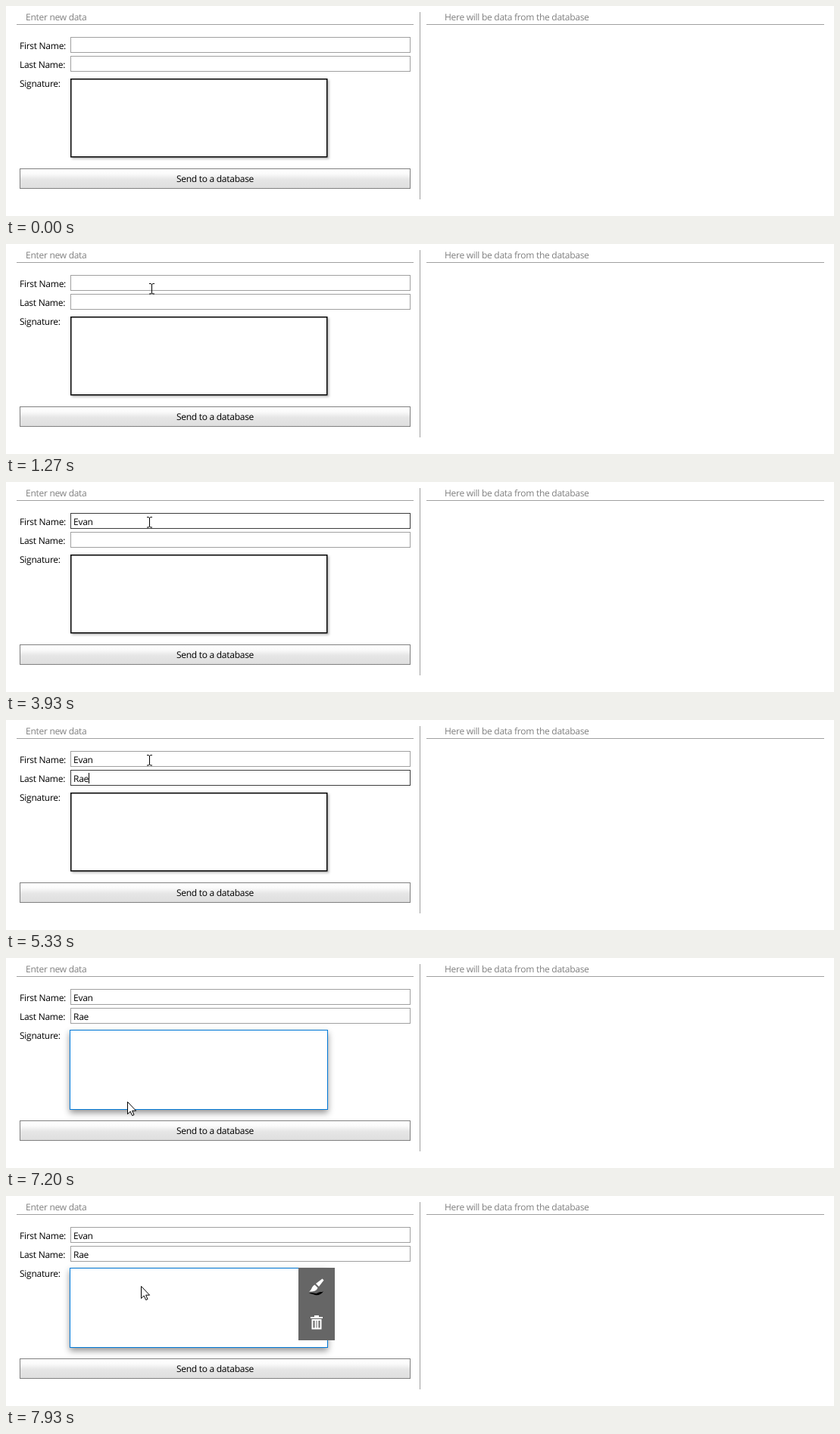
Recreate the animation shown at these times as an HTML page. Size 1093 by 278 pixels, loop 8000 ms.

```html
<!DOCTYPE html>
<html lang="en">
<head>
<meta charset="utf-8">
<title>Signature form</title>
<style>
  html, body { margin: 0; width: 100%; height: 100%; overflow: hidden; background: #fff; }
  svg { display: block; width: 100%; height: 100%; }
  text { font: 12px "Open Sans", "Noto Sans", sans-serif; letter-spacing: -0.27px; text-rendering: geometricPrecision; white-space: pre; }
  .head { fill: #808080; }
  .rule { stroke: #a0a0a0; }
  .field { fill: #fff; stroke: #a0a0a0; }
  .field.focus { stroke: #3c3c3c; }
</style>
</head>
<body>
<svg viewBox="0 0 1093 278">
  <defs>
    <linearGradient id="face" x1="0" y1="0" x2="0" y2="1">
      <stop offset="0" stop-color="#fff"/>
      <stop offset=".25" stop-color="#fbfbfb"/>
      <stop offset=".55" stop-color="#e6e6e6"/>
      <stop offset="1" stop-color="#dedede"/>
    </linearGradient>
    <filter id="soft" x="-10%" y="-20%" width="120%" height="140%"><feDropShadow dx="2" dy="2" stdDeviation="1.5" flood-opacity=".25"/></filter>
    <filter id="lift" x="-10%" y="-20%" width="120%" height="140%"><feDropShadow dx="0" dy="4" stdDeviation="4" flood-opacity=".42"/></filter>
  </defs>

  <text class="head" x="26" y="19">Enter new data</text>
  <text class="head" x="579" y="19">Here will be data from the database</text>
  <path class="rule" fill="none" d="M14 24.5H538M555 24.5H1080M546.5 8V256"/>

  <text x="18" y="57">First Name:</text>
  <text x="18" y="82">Last Name:</text>
  <text x="18" y="107">Signature:</text>

  <rect id="field0" class="field" x="85.5" y="41.5" width="448" height="20"/>
  <rect id="field1" class="field" x="85.5" y="66.5" width="448" height="20"/>
  <text id="value0" x="89" y="57"></text>
  <text id="value1" x="89" y="82"></text>
  <rect id="caret" width="1" height="14"/>

  <rect x="18.5" y="215.5" width="515" height="26" fill="url(#face)" stroke="#808080"/>
  <text x="276" y="233" text-anchor="middle">Send to a database</text>

  <rect id="padIdle" x="85.75" y="96.75" width="338" height="103" fill="#fff" stroke="#000" stroke-width="1.5" filter="url(#soft)"/>
  <rect id="padActive" x="84.5" y="95.5" width="340" height="105" fill="#fff" stroke="#0078d7" filter="url(#lift)"/>

  <g id="tools" fill="#fff">
    <rect x="386" y="95" width="48" height="96" fill="#666"/>
    <path d="M417.5 109.5L419.5 111.5L413 120L409 116Z"/>
    <path d="M407.5 117.5L411.5 121.5C410 126 405 127 400 126.5C403.5 125 403 120 407.5 117.5Z"/>
    <path fill="#000" d="M400 129C404 126 408 131 412 128C415 126 417 128 419 126C417 130 412 132 408 131C405 130 403 129 400 129Z"/>
    <path d="M407 158h6v2h5v2h-16v-2h5z"/>
    <path fill="none" stroke="#fff" stroke-width="2" d="M404.5 163V175.5H415.5V163M404 164H416M408.5 164V175M411.5 164V175"/>
  </g>

  <path id="arrow" d="M.5 .5V16.6L4.2 13.1L6.7 18.6L9 17.6L6.6 12.2H11.6Z" fill="#fff" stroke="#000"/>
  <path id="beam" d="M-3 -6.5H-1L.5 -5.5L2 -6.5H4M.5 -5.5V6M-3 7H-1L.5 6L2 7H4" fill="none" stroke="#000"/>
</svg>
<script>
const LOOP = 8000, TICK = 200 / 3;
const $ = id => document.getElementById(id);
const show = (id, on) => $(id).setAttribute('visibility', on ? 'visible' : 'hidden');

const linear = p => p;
const easeOut = p => 1 - (1 - p) ** 1.7;
const smooth = p => p * p * (3 - 2 * p);

// Pointer moves, in ticks
const moves = [
  { from: 8,   to: 17,  a: [255, 259], b: [191, 60],  ease: easeOut },
  { from: 18,  to: 19,  a: [191, 60],  b: [192, 59],  ease: linear },
  { from: 19,  to: 22,  a: [192, 59],  b: [189, 53],  ease: linear },
  { from: 94,  to: 100, a: [189, 53],  b: [114, 157], ease: smooth },
  { from: 105, to: 108, a: [114, 157], b: [160, 190], ease: linear },
  { from: 109, to: 112, a: [160, 190], b: [173, 165], ease: linear },
  { from: 114, to: 119, a: [173, 165], b: [178, 119], ease: smooth }
];

// Typing: tick of focus, then of each key
const inputs = [
  { text: 'Evan', focus: 24, blur: 65,  keys: [39, 42, 45, 51], top: 45 },
  { text: 'Rae',  focus: 65, blur: 102, keys: [73, 77, 80],     top: 70 }
];
const PAD_OPEN = 102, TOOLS_OPEN = 111, BLINK = 8;

function pointerAt(k) {
  const m = moves.filter(m => k >= m.from).pop();
  if (!m) return null;
  const p = m.ease(Math.min(1, (k - m.from) / (m.to - m.from)));
  return m.a.map((v, i) => Math.round(v + (m.b[i] - v) * p));
}

function drawPointer(k) {
  const pos = pointerAt(k);
  const overField = pos && pos[0] > 85 && pos[0] < 534 &&
    ((pos[1] > 41 && pos[1] < 60) || (pos[1] > 66 && pos[1] < 87));
  show('arrow', pos && !overField);
  show('beam', overField);
  if (pos) for (const id of ['arrow', 'beam']) $(id).setAttribute('transform', `translate(${pos})`);
}

function drawInputs(k) {
  let caretOn = false;
  inputs.forEach((input, i) => {
    const typed = input.keys.filter(key => key <= k);
    const value = $('value' + i);
    value.textContent = input.text.slice(0, typed.length);
    const focused = k >= input.focus && k < input.blur;
    $('field' + i).classList.toggle('focus', focused);
    if (!focused) return;
    const last = typed.length ? typed[typed.length - 1] : input.focus;
    caretOn = Math.floor((k - last) / BLINK) % 2 === 0;
    const width = typed.length ? value.getComputedTextLength() : 0;
    $('caret').setAttribute('x', 89 + Math.round(width));
    $('caret').setAttribute('y', input.top);
  });
  show('caret', caretOn);
}

function draw(ms) {
  const k = Math.floor((ms + 4) / TICK);
  drawInputs(k);
  show('padIdle', k < PAD_OPEN);
  show('padActive', k >= PAD_OPEN);
  show('tools', k >= TOOLS_OPEN);
  drawPointer(k);
}

const start = performance.now();
function frame() {
  draw((performance.now() - start) % LOOP);
  requestAnimationFrame(frame);
}
frame();
</script>
</body>
</html>
```
